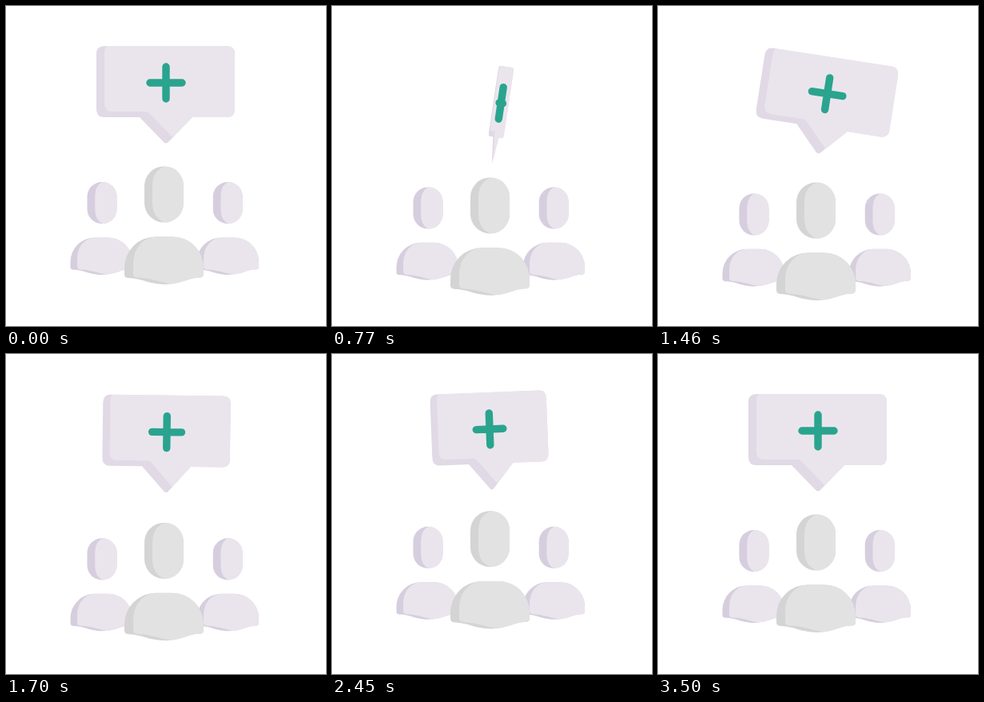
Animation, 400 px wide and 400 px high, one loop 3620 ms. Source, as an HTML page:

```html
<!DOCTYPE html>
<html lang="en">
<head>
<meta charset="utf-8">
<title>Patient group</title>
<style>
  html, body { margin: 0; width: 100%; height: 100%; overflow: hidden; background: #fff; }
  svg { display: block; width: 100%; height: 100%; }
  .soft { fill: #eae5ed; }
  .shade { fill: #d6cede; }
  #lead .soft { fill: #e2e2e2; }
  #lead .shade { fill: #d4d4d4; }
  #bubble .shade { fill: #e1d9e5; }
  #plus { fill: none; stroke: #2aa48e; stroke-width: 9.4; stroke-linecap: round; }
</style>
</head>
<body>
<svg viewBox="0 0 400 400">
  <g id="sides"></g>
  <g id="lead"></g>
  <g id="bubble">
    <g id="card">
      <path class="shade" d="M-77-122H76Q86-122 86-112V-43Q86-33 76-33H33L2.500-1.500Q0 .5-2.500-1.500L-33-33H-77Q-87-33-87-43V-112Q-87-122-77-122Z"/>
      <path class="soft" d="M-74-122Q-77-119-77-114V-50Q-77-40-67-40H-26Q-23-40-21-38L8-8L33-33H76Q86-33 86-43V-112Q86-122 76-122Z"/>
    </g>
    <path id="plus"/>
  </g>
</svg>
<script>
const LOOP = 3620, STEP = 30, START = 530, END = 3500, LAUNCH = 500;
const $ = id => document.getElementById(id);

const easeOut = u => Math.sin(u * Math.PI / 2);
const easeInOut = u => (1 - Math.cos(u * Math.PI)) / 2;

// Launches quickly from rest, then swings gently through each [time, value] turn
function swing(t, rest, ...turns) {
  let from = LAUNCH, value = rest, ease = easeOut;
  if (t <= from) return rest;
  for (const [to, next] of turns) {
    if (t < to) return value + (next - value) * ease((t - from) / (to - from));
    from = to;
    value = next;
    ease = easeInOut;
  }
  return value;
}

const pose = t => ({
  drop: swing(t, 0, [920, 29], [2060, -6.4], [2700, 0]),
  tilt: swing(t, 0, [1150, 14], [2060, -6], [2930, 3], [END, 0]),
  wide: swing(t, 1, [800, 0.1], [1540, 1], [1640, 1], [1955, 0.1], [2640, 1]),
  lead: swing(t, 0, [1200, 24.5], [2230, -5], [3150, 0]),
  sides: swing(t, 0, [1420, 14.5], [2320, -4.4], [3150, 0])
});

const head = inset => `
  <rect class="shade" width="49" height="70" rx="24.5"/>
  <path class="soft" d="M26 0A23 24.500 0 0 1 49 24.500V45.500A23 24.500 0 0 1 26 70Q${inset} 65 ${inset} 45V25Q${inset} 5 26 0Z"/>`;
const TORSO = `
  <path class="shade" d="M0 47V39A39 39 0 0 1 39 0H60A39 39 0 0 1 99 39V46Q99 51 94 51C80 51 72 59 51 59.500C29 59 23 52 5 51.500Q0 51 0 47Z"/>
  <path class="soft" d="M38 0H60A39 39 0 0 1 99 39V46Q99 51 94 51C81 51 73 58 57 59C38 55 33 52 17 51.200Q11 51 11 46V35C11 16 21 2 38 0Z"/>`;

const place = (shape, x, y, sx = 1, sy = sx) =>
  `<g transform="translate(${x} ${y}) scale(${sx} ${sy})">${shape}</g>`;
const side = (headX, torsoX) =>
  place(head(13), headX, 220, 0.755, 0.745) + place(TORSO, torsoX, 289.4, 0.783);

$('sides').innerHTML = side(101.5, 80.5) + side(258.7, 238.5);
$('lead').innerHTML = place(head(10), 173, 200.5) + place(TORSO, 148, 288.4);

const move = (id, value) => $(id).setAttribute('transform', value);

function draw(t) {
  const { drop, tilt, wide, lead, sides } = pose(t);
  const arm = 20 * wide;
  move('sides', `translate(0 ${sides})`);
  move('lead', `translate(0 ${lead})`);
  move('bubble', `translate(200 ${172 + drop}) rotate(${tilt})`);
  move('card', `scale(${wide} 1)`);
  $('plus').setAttribute('d', `M0-96V-56M${-arm}-76H${arm}`);
}

const began = performance.now();
function frame() {
  const t = (performance.now() - began) % LOOP;
  const held = START + Math.floor((t - START) / STEP) * STEP;
  draw(t < START ? 0 : Math.min(held, END));
  requestAnimationFrame(frame);
}
frame();
</script>
</body>
</html>
```
